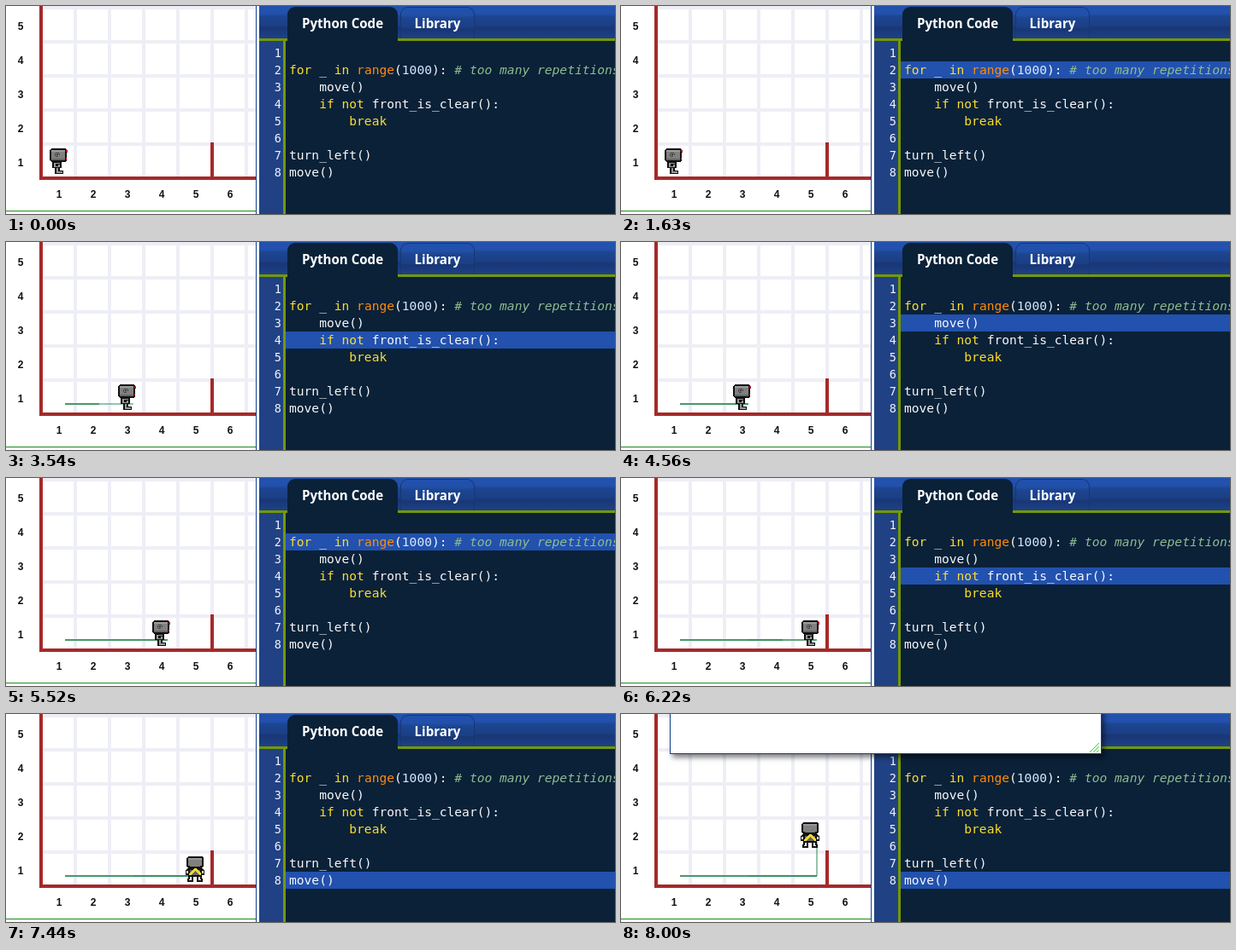
An HTML page that plays this animation: 712 by 244 pixels, repeating every 9460 ms.

```html
<!DOCTYPE html>
<html lang="en">
<head>
<meta charset="utf-8">
<title>Robot world</title>
<style>
  html, body { margin: 0; width: 100%; height: 100%; overflow: hidden; background: #fff; }
  #stage { position: relative; width: 712px; height: 244px; overflow: hidden; background: #fff; }
  #stage div, #stage svg { position: absolute; }
  #world { left: 0; top: 0; }
  #world text { font: bold 12px "Liberation Sans", Arial, sans-serif; text-anchor: middle; fill: #111; }
  #edge { left: 292px; top: 0; width: 1px; height: 244px; background: #12408f; }
  #panel { left: 296px; top: 0; width: 416px; height: 244px; background: #0a2138; overflow: hidden; }
  #head {
    left: 0; top: 0; width: 416px; height: 38px;
    background: linear-gradient(#2251ae 0, #2251ae 9px, #1d4590 12px, #1b3f86 23px, #193674 25px, #1d4189 38px);
  }
  #rule { left: 0; top: 38px; width: 416px; height: 3px; background: #769800; }
  .tab {
    box-sizing: border-box; border-radius: 9px 9px 0 0; color: #fff; text-align: center;
    font: bold 15.1px/36px "Noto Sans", "Open Sans", sans-serif; white-space: pre;
  }
  #code-tab { left: 33px; top: 1px; width: 129px; height: 41px; line-height: 38px; background: #0a2138; }
  #lib-tab {
    left: 165px; top: 1px; width: 87px; height: 37px; border: 1px solid #183674; border-bottom: 0;
    background: linear-gradient(#2251ae 0, #2050a8 9px, #1d4590 12px, #1b3f86 23px, #193674 25px, #1d4189 36px);
  }
  #gutter { left: 0; top: 41px; width: 28px; height: 203px; background: #204184; border-right: 3px solid #769800; }
  #mark { left: 31px; width: 385px; height: 20px; background: #2251ae; }
  .line, .num { height: 20px; font: 14.6px/20px "DejaVu Sans Mono", monospace; white-space: pre; color: #f8f8f8; }
  .line { left: 35px; }
  .num { left: 0; width: 26px; text-align: right; font-size: 13.5px; color: #f0f4fa; }
  .k { color: #fbde2d; }
  .b { color: #ff8c0a; }
  .n { color: #d3e6f8; }
  .c { color: #8fbc8f; font-style: italic; }
  #dialog {
    left: 57px; top: -60px; width: 503px; height: 105px; background: #fff;
    border: 1px solid #12408f; box-shadow: 3px 4px 6px rgba(0, 0, 0, .5);
  }
  #dialog svg { right: 1px; bottom: 0; }
</style>
</head>
<body>
<div id="stage">
  <svg id="world" width="292" height="244" shape-rendering="crispEdges">
    <g id="grid"></g>
    <g id="trail" fill="#2e8b57"></g>
    <g id="side">
      <path d="M2 0H18L20 2V14L18 16H2L0 14V2Z" fill="#111"/>
      <path d="M2 2H18V14H2Z" fill="#808080"/>
      <path d="M2 2H18V4H2Z" fill="#999"/>
      <path d="M2 12H18V14H2Z" fill="#666"/>
      <path d="M7 5H11V6H7ZM6 6H7V9H6ZM11 6H12V8H11ZM7 9H10V10H7Z" fill="#444"/>
      <path d="M8 7H10V8H8Z" fill="#111"/>
      <path d="M19 2H21V4H19ZM20 4H21V5H20ZM19 11H20V13H19Z" fill="#c8102e"/>
      <path d="M3 16H14V23H12V26H16V30H6V23H3Z" fill="#111"/>
      <path d="M5 17H12V18H7V21H10V19H12V22H5ZM8 23H10V28H8ZM10 27H15V29H8V28H10Z" fill="#999"/>
    </g>
    <g id="back">
      <path d="M3 0H19L21 2V11L19 14H3L1 11V2Z" fill="#111"/>
      <path d="M3 2H19V11H17V12H5V11H3Z" fill="#808080"/>
      <path d="M3 2H19V4H3Z" fill="#969696"/>
      <path d="M3 14H19L22 16V22H19V26H20V30H13V24H9V30H2V26H3V22H0V16Z" fill="#111"/>
      <path d="M1 17H3V20H1ZM19 17H21V20H19ZM5 24H7V28H4V27H5ZM15 24H17V27H18V28H15Z" fill="#fff"/>
      <path d="M5 16H17V22H5Z" fill="#666"/>
      <path d="M10 14H12L18 20V22H16L11 17L6 22H4V20Z" fill="#f0dc28"/>
    </g>
  </svg>
  <div id="edge"></div>
  <div id="panel">
    <div id="head"></div>
    <div id="rule"></div>
    <div id="lib-tab" class="tab">Library</div>
    <div id="gutter"></div>
    <div id="code-tab" class="tab">Python Code</div>
    <div id="mark"></div>
  </div>
  <div id="dialog">
    <svg width="13" height="13"><path d="M1 12L12 1M5 12L12 5M9 12L12 9" stroke="#3cc83c"/></svg>
  </div>
</div>
<script>
const LOOP = 9460;
const $ = id => document.getElementById(id);

// [time, highlighted line]; 0 means none
const MARKS = [
  [0, 0], [1630, 2], [2090, 3], [2520, 4], [3050, 2], [3180, 3], [3540, 4], [4070, 2], [4560, 3],
  [4860, 4], [5520, 2], [5820, 3], [6020, 4], [6780, 5], [7010, 7], [7440, 8]
];
// [time, column, row, facing]
const POSES = [
  [0, 1, 1, 'side'], [2520, 2, 1, 'side'], [3540, 3, 1, 'side'], [4860, 4, 1, 'side'],
  [6020, 5, 1, 'side'], [7440, 5, 1, 'back'], [7700, 5, 2, 'back']
];
// Each repaint of a half-transparent segment makes it denser
const TRAILS = [
  { box: [69, 189, 40, 2], paints: [2520, 2820, 3050] },
  { box: [109, 189, 40, 2], paints: [3540, 4100, 4560] },
  { box: [149, 189, 40, 2], paints: [4860, 5060, 5520, 5820] },
  { box: [189, 189, 40, 2], paints: [6020, 6220, 6780, 7010] },
  { box: [228, 150, 2, 40], paints: [7700] }
];
const DIALOG_AT = 8000;

const CODE = [
  '',
  '<i k>for</i> _ <i k>in</i> <i b>range</i>(<i n>1000</i>): <i c># too many repetitions</i>',
  '    move()',
  '    <i k>if</i> <i k>not</i> front_is_clear():',
  '        <i k>break</i>',
  '',
  'turn_left()',
  'move()'
];

function svg(parent, tag, attrs) {
  const el = document.createElementNS('http://www.w3.org/2000/svg', tag);
  for (const name in attrs) el.setAttribute(name, attrs[name]);
  return parent.appendChild(el);
}

function rect(parent, [x, y, width, height], attrs) {
  return svg(parent, 'rect', { x, y, width, height, ...attrs });
}

function row(className, n, html) {
  const el = document.createElement('div');
  el.className = className;
  el.style.top = lineTop(n) + 'px';
  el.innerHTML = html;
  $('panel').append(el);
}

function lineTop(n) {
  return 25 + 20 * n;
}

function buildWorld() {
  const grid = $('grid');
  const pale = { fill: '#eeeef6' };
  const wall = { fill: '#a52a2a' };
  for (let x = 79; x < 292; x += 40) rect(grid, [x, 0, 4, 200], pale);
  for (let y = 0; y < 200; y += 40) rect(grid, [43, y, 249, 4], pale);
  rect(grid, [39, 0, 4, 204], wall);
  rect(grid, [39, 200, 253, 4], wall);
  rect(grid, [239, 160, 4, 40], wall);
  rect(grid, [0, 240, 292, 1], { fill: '#1a8a1a' });
  for (let i = 1; i <= 6; i++) svg(grid, 'text', { x: 22 + 40 * i, y: 225 }).textContent = i;
  for (let i = 1; i <= 5; i++) svg(grid, 'text', { x: 17, y: 228 - 40 * i }).textContent = i;
  for (const t of TRAILS) t.el = rect($('trail'), t.box);
}

function buildCode() {
  CODE.forEach((text, i) => {
    row('num', i + 1, i + 1);
    row('line', i + 1, text.replace(/<i (\w)>/g, '<span class="$1">').replace(/<\/i>/g, '</span>'));
  });
}

function current(steps, t) {
  return steps.filter(s => s[0] <= t).pop();
}

function draw(t) {
  const line = current(MARKS, t)[1];
  $('mark').style.display = line ? '' : 'none';
  $('mark').style.top = lineTop(line) + 'px';

  const [, col, level, facing] = current(POSES, t);
  for (const id of ['side', 'back']) {
    const left = id === 'side' ? 11 : 10;
    $(id).style.display = id === facing ? '' : 'none';
    $(id).setAttribute('transform', `translate(${left + 40 * col} ${207 - 40 * level})`);
  }

  for (const { el, paints } of TRAILS) {
    el.setAttribute('opacity', 1 - 0.5 ** paints.filter(p => p <= t).length);
  }
  $('dialog').style.display = t >= DIALOG_AT ? '' : 'none';
}

buildWorld();
buildCode();
const start = performance.now();
function tick() {
  draw((performance.now() - start) % LOOP);
  requestAnimationFrame(tick);
}
tick();
</script>
</body>
</html>
```
